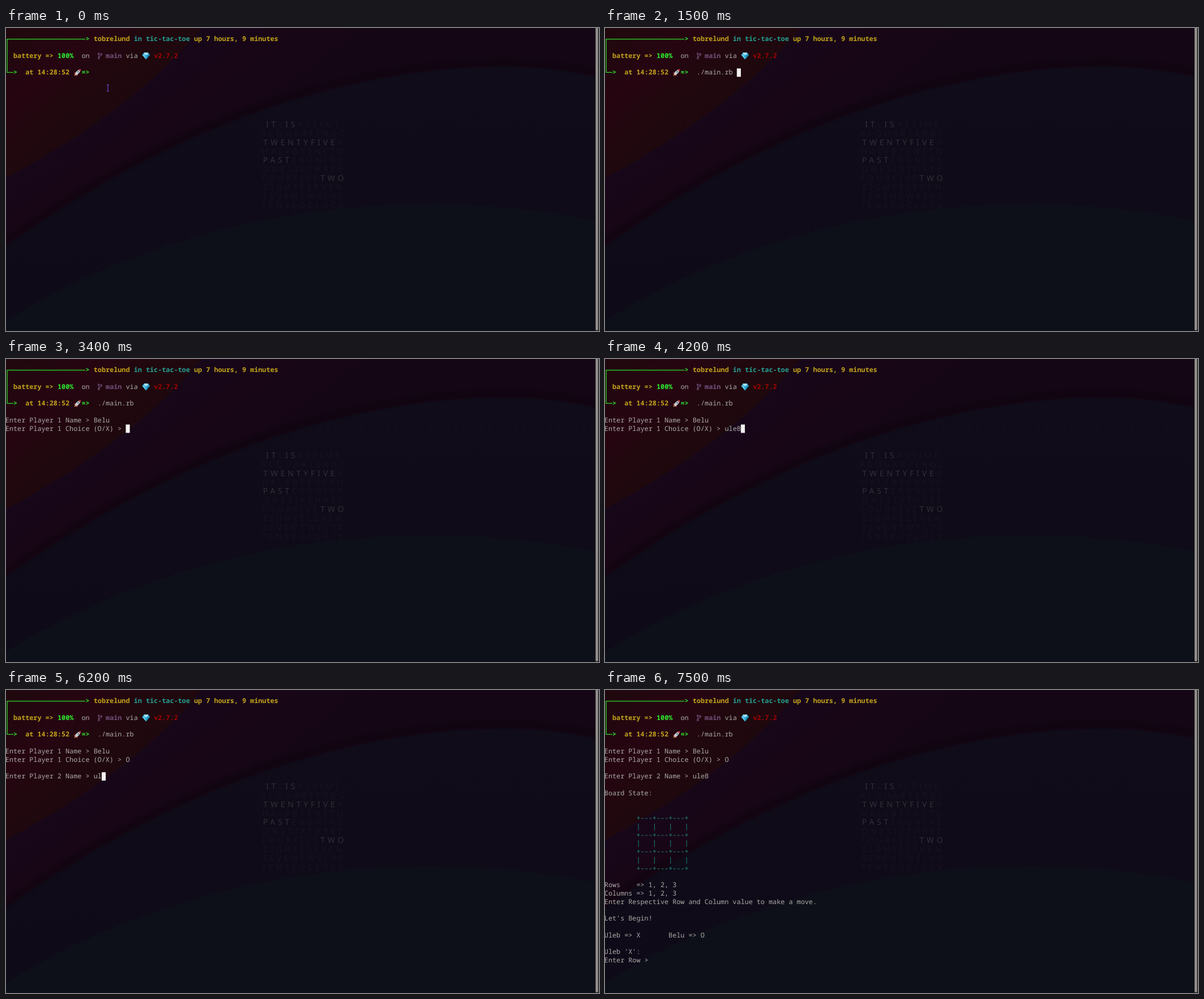
Write an HTML page that moves like this. It is 1047x535 px and loops after 8000 ms.

```html
<!DOCTYPE html>
<html lang="en">
<head>
<meta charset="utf-8">
<title>Terminal game</title>
<style>
  html, body { margin: 0; width: 100%; height: 100%; overflow: hidden; background: #0d1019; }
  svg { display: block; width: 100vw; height: 100vh; }
  text { white-space: pre; text-rendering: geometricPrecision; font-variant-ligatures: none; }
  #term text { font: 11.817px "Noto Sans Mono", "DejaVu Sans Mono", monospace; fill: #aeaaa8; }
  #term .b { font-weight: 700; }
  #term .yellow { fill: #c4a31a; }
  #term .green { fill: #2ee82e; }
  #term .teal { fill: #25a094; }
  #term .purple { fill: #75507b; }
  #term .red { fill: #a40000; }
  #term .grid { fill: #1d9488; }
  #clock text { font: 14px "Noto Sans", "Open Sans", sans-serif; letter-spacing: 4.8px; text-anchor: middle; fill: #fff; fill-opacity: .035; }
  #clock .lit { fill: #e8dccb; fill-opacity: .17; }
</style>
</head>
<body>
<svg viewBox="0 0 1047 535" preserveAspectRatio="none">
  <defs>
    <linearGradient id="ember" gradientUnits="userSpaceOnUse" x1="0" y1="0" x2="185" y2="215">
      <stop offset="0" stop-color="#1f080d"/>
      <stop offset=".38" stop-color="#260511"/>
      <stop offset=".62" stop-color="#20080e"/>
      <stop offset="1" stop-color="#1c090e"/>
    </linearGradient>
    <linearGradient id="plum" gradientUnits="userSpaceOnUse" x1="150" y1="130" x2="270" y2="290">
      <stop offset="0" stop-color="#16071a"/>
      <stop offset=".5" stop-color="#180616"/>
      <stop offset="1" stop-color="#150616"/>
    </linearGradient>
    <linearGradient id="navy" x1="0" y1="0" x2="0" y2="1">
      <stop offset="0" stop-color="#100c19"/>
      <stop offset=".45" stop-color="#0f0b18"/>
      <stop offset="1" stop-color="#0f0a18"/>
    </linearGradient>
    <filter id="soft"><feGaussianBlur stdDeviation="5"/></filter>
  </defs>

  <g id="wall">
    <rect width="1047" height="535" fill="url(#plum)"/>
    <path d="M0 0H345C260 105 130 195 0 265Z" fill="url(#ember)"/>
    <path id="arc" d="M0 385C250 205 560 68 880 68C940 68 990 74 1047 87V535H0Z" fill="url(#navy)"/>
    <path d="M0 517C220 380 480 311 750 311C850 311 950 322 1047 341V535H0Z" fill="#0d1019"/>
    <path d="M-10 384C250 197 560 60 880 60C940 60 990 66 1047 79" fill="none" stroke="#0c0610" stroke-opacity=".35" stroke-width="9" filter="url(#soft)"/>
  </g>
  <g id="clock"></g>

  <g id="term">
    <path d="M140 19.6H2V78.4H13" fill="none" stroke="#2bd92b" stroke-width="1.3"/>
    <g id="branch" fill="none" stroke="#75507b" stroke-width="1.1">
      <circle cx="163.8" cy="45.3" r="1.3"/>
      <circle cx="168.2" cy="46.3" r="1.3"/>
      <circle cx="163.8" cy="53.2" r="1.3"/>
      <path d="M163.8 46.6V51.9M168.2 47.6C168.2 50.4 163.8 49 163.8 51.9"/>
    </g>
    <g id="gem">
      <path d="M243.5 43.5H251L254 47.6L247.3 55.4L240.5 47.6Z" fill="#32a9d3"/>
      <path d="M243.5 43.5H251L249.8 47.6H244.7Z" fill="#a9e4f4"/>
      <path d="M240.5 47.6H244.7L247.3 55.4Z" fill="#65cdea"/>
      <path d="M249.8 47.6H254L247.3 55.4Z" fill="#1788b5"/>
    </g>
    <g id="rocket" transform="translate(126.5 78.5) rotate(45)">
      <path d="M-1.6 5H1.6L0 8.5Z" fill="#e9a13b"/>
      <path d="M-2 1L-4.2 5.2H4.2L2 1Z" fill="#b8323c"/>
      <path d="M0 -8C3 -4.5 3 1 1.9 5H-1.9C-3 1 -3 -4.5 0 -8Z" fill="#c3cdd2"/>
      <path d="M0 -8Q1.7 -6.3 2.1 -4.3H-2.1Q-1.7 -6.3 0 -8Z" fill="#c43a43"/>
      <circle cy="-1.6" r="1.2" fill="#3e5c70"/>
    </g>
  </g>

  <path id="mouse" d="M177.5 100.5H182M177.5 111.5H182M179.8 100.5V111.5" fill="none" stroke="#5a369c" stroke-width="1.6"/>
  <rect x="1039.5" width="7.5" height="535" fill="#19171b"/>
  <rect x="1041" y="-3" width="4.6" height="537" rx="2.3" fill="#918e8c"/>
</svg>

<script>
const NS = 'http://www.w3.org/2000/svg';
const LOOP = 8000, CELL = 7.09, LINE = 14.76;
const colX = col => col * CELL - 1.2;
const rowY = row => 71.4 + (row - 5) * LINE;
const $ = id => document.getElementById(id);

function add(parent, tag, attrs = {}, content = '') {
  const el = document.createElementNS(NS, tag);
  for (const key in attrs) el.setAttribute(key, attrs[key]);
  el.textContent = content;
  parent.append(el);
  return el;
}

const write = (parent, row, col, content, cls = '') =>
  add(parent, 'text', { x: colX(col), y: rowY(row) + 11, class: cls }, content);

// Word clock: each row with the span of letters that is lit
[
  ['ITLISASTIME', 0, 2, 3, 5], ['ACQUARTERDC'], ['TWENTYFIVEX', 0, 10],
  ['HALFBTENFTO'], ['PASTERUNINE', 0, 4], ['ONESIXTHREE'],
  ['FOURFIVETWO', 8, 11], ['EIGHTELEVEN'], ['SEVENTWELVE'], ['TENSEOCLOCK']
].forEach(([word, ...spans], i) => {
  const line = add($('clock'), 'text', { x: 526.4, y: 175 + i * 15.85 });
  let at = 0;
  for (let s = 0; s < spans.length; s += 2) {
    add(line, 'tspan', {}, word.slice(at, spans[s]));
    add(line, 'tspan', { class: 'lit' }, word.slice(spans[s], spans[s + 1]));
    at = spans[s + 1];
  }
  add(line, 'tspan', {}, word.slice(at));
});

// Shell prompt
const term = $('term');
[
  [1, 20, '>', 'b green'],
  [1, 22, 'tobrelund', 'b yellow'],
  [1, 32, 'in tic-tac-toe', 'b teal'],
  [1, 47, 'up 7 hours, 9 minutes', 'b yellow'],
  [3, 2, 'battery =>', 'b yellow'],
  [3, 13, '100%', 'b green'],
  [3, 19, 'on'],
  [3, 25, 'main', 'b purple'],
  [3, 30, 'via'],
  [3, 37, 'v2.7.2', 'b red'],
  [5, 2, '>', 'b green'],
  [5, 5, 'at 14:28:52', 'b yellow'],
  [5, 19, '=>', 'b green']
].forEach(args => write(term, ...args));

// Fields are filled one after another; "done" is the final entry
const fields = [
  { row: 5, col: 23, prompt: '', done: './main.rb' },
  { row: 6, col: 0, prompt: '', done: '' },
  { row: 7, col: 22, prompt: 'Enter Player 1 Name >', done: 'Belu' },
  { row: 8, col: 30, prompt: 'Enter Player 1 Choice (O/X) >', done: 'O' },
  { row: 10, col: 22, prompt: 'Enter Player 2 Name >', done: 'uleB' },
  { row: 32, col: 12, prompt: 'Enter Row >', done: '' }
];
for (const f of fields) {
  f.group = add(term, 'g');
  write(f.group, f.row, 0, f.prompt);
  f.entry = write(f.group, f.row, f.col, '');
}

const game = fields[5].group;
write(game, 12, 0, 'Board State:');
for (let i = 0; i < 7; i++)
  write(game, 15 + i, 8, i % 2 ? '|   |   |   |' : '+---+---+---+', 'grid');
[
  [23, 'Rows    => 1, 2, 3'],
  [24, 'Columns => 1, 2, 3'],
  [25, 'Enter Respective Row and Column value to make a move.'],
  [27, "Let's Begin!"],
  [29, 'Uleb => X       Belu => O'],
  [31, "Uleb 'X':"]
].forEach(([row, content]) => write(game, row, 0, content));

const cursor = add(term, 'rect', { width: 7.1, height: LINE, fill: '#f4f2f3' });

// [ms, field, typed so far, cursor hidden]
const steps = [
  [0, 0, '', true], [400, 0, ''], [700, 0, './'], [900, 0, './ma'],
  [1100, 0, './mai'], [1200, 0, './main'], [1500, 0, './main.rb '],
  [1700, 1, ''], [1800, 2, ''], [2500, 2, '', true], [2600, 2, ''],
  [2700, 2, 'B'], [2900, 2, 'Be'], [3000, 2, 'Bel'], [3100, 2, 'Belu'],
  [3400, 3, ''], [4000, 3, 'u'], [4100, 3, 'ul'], [4200, 3, 'uleB'],
  [4600, 3, 'ule'], [4800, 3, 'ul'], [4900, 3, 'u'], [5000, 3, ''],
  [5200, 3, 'O'], [5500, 4, ''], [6200, 4, 'ul'], [6500, 4, 'ule'],
  [6600, 4, 'uleB'], [7000, 5, ''], [7500, 5, '', true]
];

function draw(ms) {
  const [, active, typed, hidden] = steps.findLast(step => step[0] <= ms);
  fields.forEach((f, i) => {
    f.group.style.display = i <= active ? '' : 'none';
    f.entry.textContent = i < active ? f.done : typed;
  });
  const { row, col } = fields[active];
  cursor.setAttribute('x', colX(col + typed.length));
  cursor.setAttribute('y', rowY(row));
  cursor.style.display = hidden ? 'none' : '';
  $('mouse').style.display = ms < 400 ? '' : 'none';
}

const start = performance.now();
function tick() {
  draw((performance.now() - start) % LOOP);
  requestAnimationFrame(tick);
}
tick();
</script>
</body>
</html>
```
